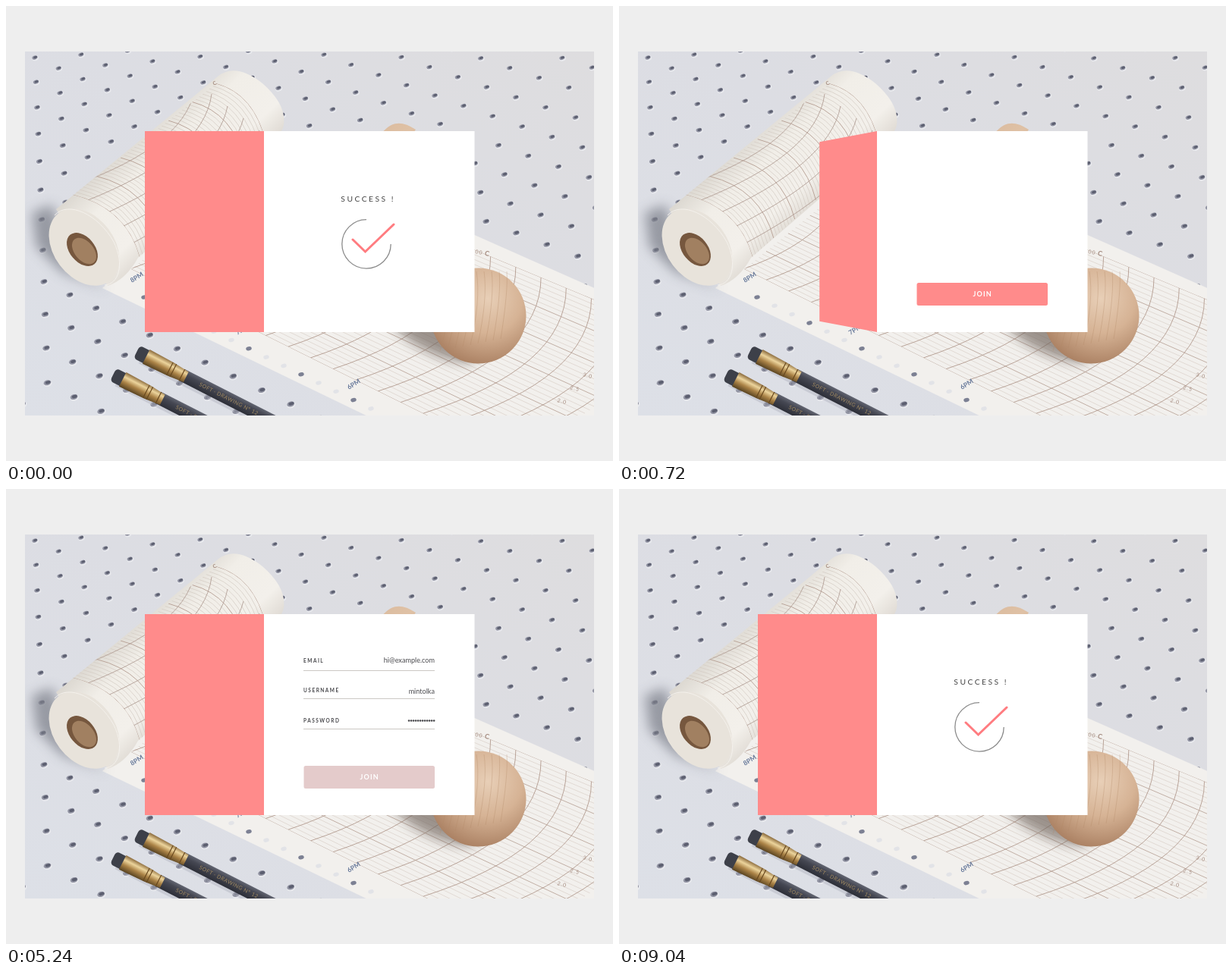
These frames come from a looping animation (800x600 px, 9.76 s). An HTML page:

```html
<!DOCTYPE html>
<html lang="en">
<head>
<meta charset="utf-8">
<title>Join form</title>
<style>
  html, body { margin: 0; width: 100%; height: 100%; overflow: hidden; background: #eee; }
  svg { display: block; width: 800px; height: 600px; }
  text { font-family: Lato, "Open Sans", sans-serif; }
  .label { font-size: 6.5px; font-weight: 700; letter-spacing: 1.5px; fill: #48484c; }
  .value { font-size: 9.1px; text-anchor: end; fill: #48484c; }
  .rule { stroke: #cbc8c4; stroke-width: 1; }
  .hour { font-size: 8.5px; font-weight: 700; fill: #66789a; }
  .mark { font-size: 7px; letter-spacing: 1px; fill: #a58c80; }
</style>
</head>
<body>
<svg viewBox="0 0 800 600" xmlns="http://www.w3.org/2000/svg">
  <defs>
    <clipPath id="frame"><rect x="25" y="60" width="750" height="480"/></clipPath>
    <clipPath id="sheet"><path d="M338 205L775 387V540H555L165 347Z"/></clipPath>
    <clipPath id="print"><path d="M88 249L277 102Q328 116 343 181L176 331Q158 266 88 249Z"/></clipPath>
    <linearGradient id="board" x1="0" y1="1" x2="1" y2="0">
      <stop offset="0" stop-color="#dde0e7"/><stop offset=".55" stop-color="#dcdde3"/><stop offset="1" stop-color="#dedddf"/>
    </linearGradient>
    <linearGradient id="roll" gradientUnits="userSpaceOnUse" x1="165" y1="175" x2="255" y2="270">
      <stop offset="0" stop-color="#dcd8d1"/><stop offset=".3" stop-color="#f1eee8"/>
      <stop offset=".75" stop-color="#f3f0eb"/><stop offset="1" stop-color="#dfdad3"/>
    </linearGradient>
    <linearGradient id="gold" x1="0" y1="0" x2="0" y2="1">
      <stop offset="0" stop-color="#8a6a3c"/><stop offset=".3" stop-color="#ecd49c"/>
      <stop offset=".6" stop-color="#ab8347"/><stop offset="1" stop-color="#54401f"/>
    </linearGradient>
    <linearGradient id="lead" x1="0" y1="0" x2="0" y2="1">
      <stop offset="0" stop-color="#626571"/><stop offset=".35" stop-color="#454752"/><stop offset="1" stop-color="#2d2f38"/>
    </linearGradient>
    <linearGradient id="handle" x1="0" y1="0" x2="1" y2="1">
      <stop offset="0" stop-color="#d3b193"/><stop offset=".5" stop-color="#dfc1a5"/><stop offset="1" stop-color="#b68d70"/>
    </linearGradient>
    <radialGradient id="ball" cx=".6" cy=".32" r=".72">
      <stop offset="0" stop-color="#e8cfb7"/><stop offset=".5" stop-color="#d6b395"/><stop offset="1" stop-color="#a97f61"/>
    </radialGradient>
    <filter id="soft" x="-40%" y="-40%" width="180%" height="180%"><feGaussianBlur stdDeviation="8"/></filter>
  </defs>

  <rect width="800" height="600" fill="#eee"/>
  <g clip-path="url(#frame)">
    <g id="photo"></g>

    <g id="card">
      <path id="flap" fill="#ff8b8b"/>
      <rect x="340" y="165" width="277.5" height="265" fill="#fff"/>

      <g id="email">
        <text class="label" x="392" y="229.4">EMAIL</text>
        <path class="rule" d="M392 239.5H565"/>
      </g>
      <g id="user">
        <text class="label" x="392" y="268.4">USERNAME</text>
        <path class="rule" d="M392 276.5H565"/>
      </g>
      <g id="pass">
        <text class="label" x="392" y="308.3">PASSWORD</text>
        <path class="rule" d="M392 316.5H565"/>
      </g>
      <text id="emailValue" class="value" x="565" y="229">hi@example.com</text>
      <text id="userValue" class="value" x="565" y="270">mintolka</text>
      <g id="passValue" fill="#48484c"></g>

      <g id="button">
        <rect id="face" x="392.5" y="365" width="172.5" height="30" rx="2.5"/>
        <text x="479.2" y="383.4" text-anchor="middle" font-size="9" font-weight="700" letter-spacing="1.2" fill="#fff">JOIN</text>
      </g>

      <path id="loader" fill="none" stroke="#999" stroke-width="1.3"/>

      <g id="success" fill="none">
        <text id="message" x="441.3" y="257.5" font-size="10.3" letter-spacing="2.5" fill="#444">SUCCESS !</text>
        <path id="ring" d="M475 281.7A32.2 32.2 0 1 0 507.2 314" pathLength="1" stroke="#8c8c8c" stroke-width="1.3"/>
        <path id="check" d="M457 308L473.5 324L511 288" pathLength="1" stroke="#ff7c80" stroke-width="3" stroke-linecap="round"/>
      </g>
    </g>
  </g>
</svg>

<script>
const LOOP = 9760;
const $ = id => document.getElementById(id);
const range = (n, fn) => Array.from({ length: n }, (_, i) => fn(i)).join('');
const mix = (a, b, k) => a + (b - a) * k;
const path = (d, stroke, width, extra = '') =>
  `<path d="${d}" fill="none" stroke="${stroke}" stroke-width="${width}" ${extra}/>`;
const shape = (d, fill, extra = '') => `<path d="${d}" fill="${fill}" ${extra}/>`;
const shadow = (d, fill, opacity) => shape(d, fill, `opacity="${opacity}" filter="url(#soft)"`);
const ellipse = (x, y, rx, ry, turn, fill) =>
  `<ellipse cx="${x}" cy="${y}" rx="${rx}" ry="${ry}" transform="rotate(${turn} ${x} ${y})" fill="${fill}"/>`;
const note = (cls, x, y, turn, text) =>
  `<text class="${cls}" transform="translate(${x} ${y}) rotate(${turn})">${text}</text>`;

// Pegboard in perspective: rows start at the left edge and slope down to the right
function holes() {
  let out = '';
  for (let row = -11; row < 13; row++) for (let col = -1; col < 24; col++) {
    const run = (31 + 0.35 * row) * col + 0.26 * col * col;
    const x = 38 + 1.5 * row + run;
    const y = 68 + 31.5 * row + 0.68 * row * Math.max(row, 0) +
      (0.42 + 0.0075 * row) * run + 0.00005 * run * (650 - run);
    if (x < 20 || x > 780 || y < 55 || y > 545) continue;
    const r = 3.7 + (y - 74) * 0.003;
    out += ellipse(x + 0.6, y + 0.9, r + 0.8, r * 0.75 + 0.5, -18, '#eaebef') +
      ellipse(x, y, r, r * 0.68, -18, '#9294a3') +
      ellipse(x + 0.7, y - 0.5, r * 0.7, r * 0.4, -18, '#5c5f70');
  }
  return out;
}

const upper = k => [338 + 437 * k, 205 + 182 * k];
const lower = k => [165 + 390 * k, 347 + 193 * k];

function sheet() {
  const along = range(37, i => {
    const k = i / 36, main = i % 6 === 0;
    const [ax, ay] = upper(0), [bx, by] = upper(1.3), [cx, cy] = lower(0), [dx, dy] = lower(1.3);
    return path(`M${mix(ax, cx, k)} ${mix(ay, cy, k)}L${mix(bx, dx, k)} ${mix(by, dy, k)}`,
      main ? '#bba79c' : '#dad0c9', main ? 0.9 : 0.7);
  });
  const across = range(22, i => {
    const k = -0.3 + i * 0.076, [x, y] = upper(k), [ex, ey] = lower(k + 0.07);
    return path(`M${x} ${y}Q${x} ${y + 105} ${ex} ${ey}`, '#b39b8f', 0.9);
  });
  const punched = range(14, i =>
    ellipse(182 + 23 * i, 384 + 11.3 * i, 3.8, 2.6, -15, i % 3 ? '#e2e3e7' : '#7c8093'));
  const scale = ['1.0', '1.5', '2.0', '2.5'].map((s, i) => note('mark', 370 + 21 * i, 407 - 15 * i, 20, s)).join('') +
    ['2.0', '2.5', '3.0'].map((s, i) => note('mark', 726 + 17 * i, 522 - 17 * i, 15, s)).join('');
  const corner = '100 <tspan font-weight="700" font-size="9">C</tspan>';
  return shape('M345 181L780 374V545H485L127 372Z', '#f2f0ed') +
    `<g clip-path="url(#sheet)">${along}${across}</g>` + punched + scale +
    note('hour', 166, 365, -32, '8PM') + note('hour', 305, 434, -32, '7PM') + note('hour', 452, 506, -32, '6PM') +
    note('mark', 333, 206, 12, corner) + note('mark', 613, 325, 12, corner);
}

function roll() {
  const rings = range(43, i => {
    const k = i / 42, main = i % 7 === 0;
    return path(`M${mix(88, 277, k)} ${mix(249, 102, k)}Q${mix(158, 328, k)} ${mix(266, 116, k)} ${mix(176, 343, k)} ${mix(331, 181, k)}`,
      main ? '#baa59a' : '#d5ccc5', main ? 1 : 0.75);
  });
  const sweeps = range(6, i =>
    path(`M${250 + 21 * i} ${100 + 16 * i}Q${245 + 16 * i} ${182 + 14 * i} ${85 + 18 * i} ${238 + 20 * i}`, '#b3a097', 0.9));
  return shadow('M34 272L62 262L85 345L135 374L75 352L40 318Z', '#7f828c', 0.75) +
    shape('M66 268L279 93Q302 74 338 102Q370 130 366 157Q364 169 343 186L174 332Q158 361 134 369Z', 'url(#roll)') +
    `<g clip-path="url(#print)">${rings}${sweeps}</g>` +
    note('mark', 274, 105, -28, '<tspan font-weight="700">C</tspan>') +
    ellipse(103, 318, 40, 56, -37, '#e8e3db') +
    path('M64 276C82 256 122 275 142 311C157 342 148 367 130 368', '#f4f1ec', 1) +
    ellipse(100.5, 321, 16.5, 25, -40, '#76573e') + ellipse(103, 323, 12.5, 20, -40, '#a18061');
}

function wood() {
  const grain = range(9, i =>
    path(`M${572 + 10 * i} ${455 - 2 * i}Q${590 + 9 * i} ${400 - 3 * i} ${580 + 10 * i} 350`, '#b08767', 0.8, 'opacity=".4"'));
  return shadow('M392 250L425 228L440 296L412 286Z', '#8f867f', 0.55) +
    shape('M403 250L503 160Q518 148 540 163L448 290Q420 298 403 250Z', 'url(#handle)') +
    shape('M403 249Q426 252 441 292Q414 290 403 249Z', '#c6a183') +
    range(4, i => path(`M${410 + 7 * i} ${257 + i}Q${425 + 4 * i} ${266 + 2 * i} 439 ${289 - 2 * i}`, '#b08a6b', 0.7)) +
    shadow('M500 410L575 400L620 470Q575 472 530 440Z', '#6d6058', 0.65) +
    `<circle cx="622.5" cy="408.5" r="63" fill="url(#ball)"/>` + grain;
}

const pencil = (x, y, turn, words) => `<g transform="translate(${x} ${y}) rotate(${turn})">
  <rect x="8" y="8" width="230" height="13" fill="#b5b8c3" opacity=".5"/>
  <rect x="66" y="0" width="190" height="17" fill="url(#lead)"/>
  <rect x="-1" y="-1" width="26" height="19" rx="5" fill="#3d4049"/>
  <path d="M13 -2L50 -1L72 1V16L50 18L13 19Z" fill="url(#gold)"/>
  <path d="M48 -1V18M53 -1V18M66 0V17" stroke="#69491f" stroke-width="1.2"/>
  <text x="92" y="11" font-size="7" letter-spacing=".5" fill="#a08a62">${words}</text></g>`;

$('photo').innerHTML = '<rect x="25" y="60" width="750" height="480" fill="url(#board)"/>' +
  holes() + sheet() + roll() + wood() +
  pencil(177, 449, 27, 'SOFT · DRAWING N° 12') + pencil(146, 479, 27, 'SOFT · DRAWING');
$('passValue').innerHTML = range(12, i => `<circle cx="${531.1 + 3 * i}" cy="305.5" r="1.3"/>`);

const part = (t, a, b) => Math.min(1, Math.max(0, (t - a) / (b - a)));
const outCubic = k => 1 - (1 - k) ** 3;
const outQuad = k => 1 - (1 - k) ** 2;
const inOut = k => k < 0.5 ? 2 * k * k : 1 - 2 * (1 - k) ** 2;
const fade = (id, k) => $(id).setAttribute('opacity', k);

// The flap swings out from behind the card's left edge
function flapPath(k) {
  const angle = (1 - k) * Math.PI / 2, near = 1089 / (1089 + 157 * Math.sin(angle));
  const x = 340 - 157 * Math.cos(angle) * near, h = 132.5 * near;
  return `M340 165L${x} ${297.5 - h}V${297.5 + h}L340 430Z`;
}

// A chord turning about the centre, growing and shrinking once per cycle
function loaderPath(k) {
  const r = 24 * Math.min(1, 1.14 * Math.sin(Math.PI * k));
  const end = deg => {
    const a = deg * Math.PI / 180;
    return `${476 + r * Math.cos(a)} ${284 + r * Math.sin(a)}`;
  };
  const mid = 81 + 720 * k;
  return `M${end(mid - 45)}L${end(mid + 45)}`;
}

function draw(time) {
  const t = time < 120 ? LOOP : time;

  $('card').setAttribute('transform', `translate(${434 * (1 - outCubic(part(t, 160, 680)))} 0)`);
  $('flap').setAttribute('d', flapPath(outQuad(part(t, 640, 1040))));

  const leave = 1 - part(t, 5480, 5840);
  [['email', 1120, 0], ['user', 1400, 4], ['pass', 1680, 4]].forEach(([id, start, rise]) => {
    const k = inOut(part(t, start, start + 400));
    fade(id, k * leave);
    $(id).setAttribute('transform', `translate(0 ${-rise * (1 - k)})`);
  });
  fade('emailValue', part(t, 2320, 2720) * leave);
  fade('userValue', part(t, 3040, 3400) * leave);
  fade('passValue', part(t, 3480, 3800) * leave);

  const grey = part(t, 4960, 5320);
  $('face').setAttribute('fill', `rgb(${mix(255, 221, grey)},${mix(139, 221, grey)},${mix(139, 221, grey)})`);
  fade('button', 1 - part(t, 7560, 7960));

  const busy = t > 5960 && t < 7960;
  $('loader').setAttribute('d', busy ? loaderPath((t - 5960) % 1000 / 1000) : '');

  $('success').setAttribute('visibility', t > 8200 ? 'visible' : 'hidden');
  fade('message', part(t, 8200, 8600));
  [['ring', 8200, 8680], ['check', 8640, 9040]].forEach(([id, a, b]) => {
    const k = inOut(part(t, a, b));
    $(id).setAttribute('stroke-dasharray', k < 1 ? `${k} 2` : 'none');
    fade(id, k > 0 ? 1 : 0);
  });
}

const began = performance.now();
function play() {
  draw((performance.now() - began) % LOOP);
  requestAnimationFrame(play);
}
play();
</script>
</body>
</html>
```
